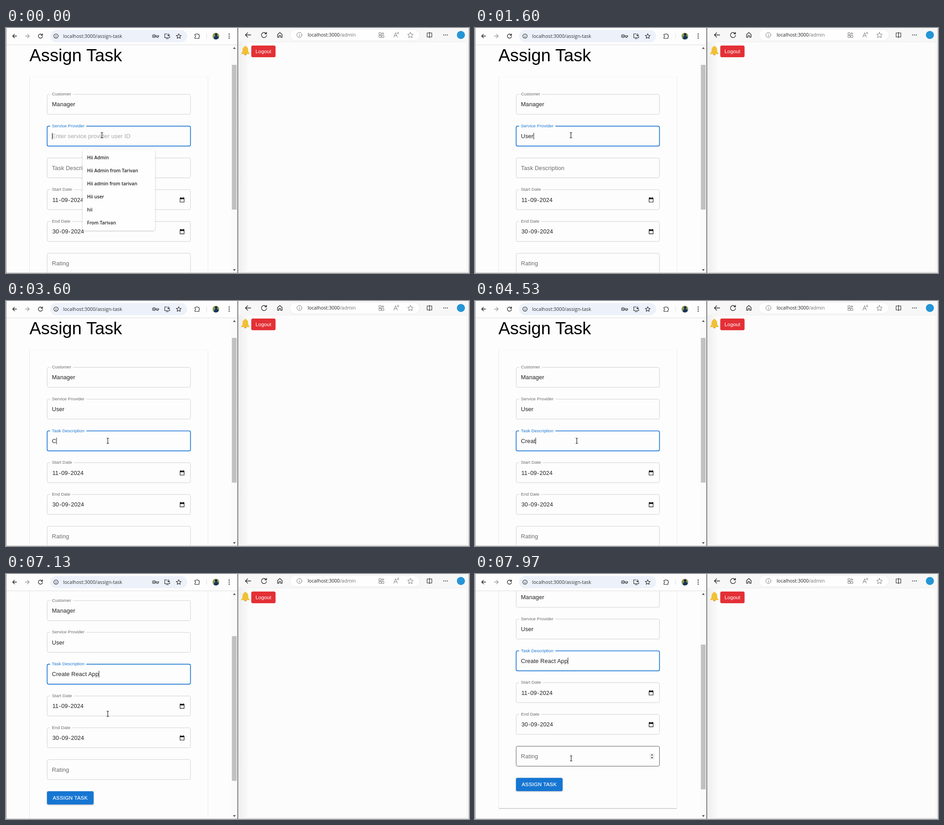
Animation, 1028 px wide and 545 px high, one loop 8000 ms. Source, as an HTML page:

```html
<!DOCTYPE html>
<html lang="en">
<head>
<meta charset="utf-8">
<title>Assign Task</title>
<style>
  html, body { margin: 0; width: 100%; height: 100%; overflow: hidden; background: #fdfdfd; }
  svg { display: block; width: 1028px; height: 545px; }
  text { white-space: pre; }
  .page text { font-family: "Liberation Sans", Arial, sans-serif; font-size: 12.9px; letter-spacing: .12px; }
  .ui { font-family: "Open Sans", "Noto Sans", sans-serif; }
  .line { fill: none; stroke: #222; stroke-width: 1.3; stroke-linecap: round; stroke-linejoin: round; }
  .thin { stroke-width: 1.1; }
  .soft { stroke: #777; stroke-width: 1; }
</style>
</head>
<body>
<svg viewBox="0 0 1028 545" xmlns="http://www.w3.org/2000/svg">
  <defs>
    <clipPath id="view"><rect x="1" y="37.5" width="499.5" height="508"/></clipPath>
    <linearGradient id="edge"><stop offset="0" stop-color="#eeeeee"/><stop offset="1" stop-color="#fcfcfc"/></linearGradient>
    <filter id="shade" x="-10%" y="-10%" width="120%" height="125%">
      <feDropShadow dx="0" dy="1" stdDeviation="1.4" flood-color="#000" flood-opacity=".28"/>
    </filter>
    <clipPath id="face"><circle cx="466" cy="18" r="7.5"/></clipPath>
  </defs>

  <rect width="1028" height="545" fill="#fdfdfd"/>

  <g class="page" clip-path="url(#view)">
    <g id="scroll">
      <path d="M52.5 108V639M448.5 108V639" stroke="#e9e9ec" fill="none"/>
      <path d="M53 108.500H448" stroke="#f7f7f7"/>
      <path d="M53 640.300H448" stroke="#e6e6e6"/>
      <path d="M53 639.300H448" stroke="#bdbdb8"/>
      <text x="52" y="74" style="font-size:38.7px;letter-spacing:0">Assign Task</text>
      <g id="fields"></g>
      <g filter="url(#shade)"><rect x="91" y="571.500" width="103.500" height="29.500" rx="3.200" fill="#1976d2"/></g>
      <text x="103.700" y="590" fill="#fff" style="font-size:11.3px;letter-spacing:.32px;stroke:#fff;stroke-width:.2px">ASSIGN TASK</text>
    </g>
  </g>

  <g id="popup" class="ui" font-size="10.200" font-weight="600" fill="#222"></g>

  <!-- scrollbar -->
  <rect x="500.500" y="37.500" width="13" height="508" fill="#fafafa"/>
  <rect id="thumb" x="501.500" y="82" width="10.500" height="322" fill="#c1c1c1"/>
  <path d="M504 46.500L507 42.500L510 46.500ZM504 536.500L507 540.500L510 536.500Z" fill="#505050"/>

  <!-- left toolbar -->
  <rect width="514" height="37" fill="#fdfdfd"/>
  <path d="M0 37.500H514" stroke="#dedede"/>
  <rect x="98" y="4.500" width="304" height="27" rx="13.500" fill="#ecf1fa"/>
  <path class="line" d="M23.500 18H14.800M18.800 14L14.800 18L18.800 22"/>
  <path class="line" stroke-opacity=".45" d="M43 18H51.700M47.700 14L51.700 18L47.700 22"/>
  <path class="line" d="M80.300 15.500A4.600 4.600 0 1 0 81 19M81 13V16.300H77.600"/>
  <circle class="line thin" cx="111" cy="18" r="4.800"/>
  <path class="line thin" d="M111 17.500V20.500M111 15.500V15.600"/>
  <text class="ui" x="126.700" y="21.800" font-size="10.700" fill="#333">localhost:3000/assign-task</text>
  <g class="line thin">
    <circle cx="328.500" cy="18" r="3.300"/><circle cx="328.500" cy="18" r=".7"/>
    <path d="M331.500 17H339V19.200H337.500V21H335V19.200H331.500"/>
    <path d="M358 13H352.500V21.500H363.500V18.500M355.500 23.800H360.500M361 12.500V17.500M358.700 15.500L361 17.800L363.300 15.500"/>
    <path d="M419.500 14H422.500A1.700 1.700 0 0 1 425.800 14H428.500V16.800A1.700 1.700 0 0 1 428.500 20V23.300H419.500V20.300A1.800 1.800 0 0 0 419.500 16.800Z"/>
    <path id="star" d="M383.500 12.600L385.100 16.200L389 16.600L386.100 19.200L386.900 23L383.500 21L380.100 23L380.900 19.200L378 16.600L381.900 16.200Z"/>
  </g>
  <path d="M445.500 12V24" stroke="#d5dff0"/>
  <g clip-path="url(#face)">
    <circle cx="466" cy="18" r="8" fill="#8d9b55"/>
    <circle cx="466.500" cy="14.500" r="2.800" fill="#1d2a3c"/>
    <ellipse cx="467" cy="23" rx="5.500" ry="6" fill="#17365b"/>
  </g>
  <g fill="#222"><circle cx="495.500" cy="13.500" r="1.200"/><circle cx="495.500" cy="18" r="1.200"/><circle cx="495.500" cy="22.500" r="1.200"/></g>
  <path d="M.5 0V545" stroke="#8a8a8a"/>
  <path d="M0 544.600H514" stroke="#a8a8a8" stroke-width=".8"/>

  <!-- right window -->
  <rect x="514" width="514" height="545" fill="#f7f7f7"/>
  <rect x="518" y="31" width="506" height="511" rx="5" fill="#fcfcfc" stroke="#ececec"/>
  <rect x="516" y="31" width="24" height="511" fill="url(#edge)"/>
  <path d="M514.600 0V545" stroke="#6b6b6b" stroke-width="1.800"/>
  <path d="M1027.500 0V545M516 544.500H1028" stroke="#b5b5b5" stroke-width=".8"/>
  <rect x="630.500" y="3.500" width="288" height="24.500" rx="12.200" fill="#fefefe" stroke="#ededed"/>
  <path class="line" d="M543.500 15.500H531.500M536.500 10.500L531.500 15.500L536.500 20.500"/>
  <path class="line" d="M577.700 12.500A5.700 5.700 0 1 0 578.600 16.500M578.500 9.500V13H574.800"/>
  <path class="line" d="M603 14.500L608 10L613 14.500V20.700H609.800V16.800H606.200V20.700H603Z"/>
  <circle class="line soft" cx="651.500" cy="15.500" r="5.600"/>
  <path class="line soft" d="M651.500 15.200V18.500M651.500 12.700V12.800"/>
  <text class="ui" x="669.700" y="19.300" font-size="10.600" fill="#222">localhost:3000<tspan fill="#707070">/admin</tspan></text>
  <path class="line soft" d="M828.500 10.500H833V15H828.500ZM828.500 16.500H833V21H828.500ZM834.500 16.500H839V21H834.500ZM836.800 9.800V14.800M834.300 12.300H839.300"/>
  <path class="line soft" d="M861 20.500L865 10.500L869 20.500M862.400 17H867.600M869 9.500Q870.500 11 869 12.800M871 8.800Q873 11 871 13.500"/>
  <path class="line soft" d="M898 9.800L899.900 13.700L904.200 14.200L901 17.200L901.900 21.400L898 19.300L894.100 21.400L895 17.200L891.800 14.200L896.100 13.700Z"/>
  <path class="line thin" d="M935 11H945.500V20H935ZM940.300 9.300V21.700"/>
  <g fill="#222"><circle cx="972" cy="15.500" r="1.100"/><circle cx="976" cy="15.500" r="1.100"/><circle cx="980" cy="15.500" r="1.100"/></g>
  <circle cx="1010" cy="15.500" r="9" fill="#2495d6"/>
  <path d="M531.500 39.500C529.800 39.500 529.700 41 529.700 41.600C525.500 42.800 525.200 47 525.200 50C525.200 53 523.500 55 522.300 56.800V58H540.700V56.800C539.500 55 537.800 53 537.800 50C537.800 47 537.500 42.800 533.300 41.600C533.300 41 533.200 39.500 531.500 39.500Z" fill="#f2c037"/>
  <path d="M528.800 58.200H534.200A2.700 2.500 0 0 1 528.800 58.200" fill="#d99a20"/>
  <rect x="544.500" y="39" width="54" height="26" rx="3.500" fill="#e33036"/>
  <text x="554" y="56" font-family="Liberation Sans, Arial, sans-serif" font-size="11.400" fill="#fff">Logout</text>

  <g id="pointer">
    <path id="beam" d="M-2.500 -6Q0 -6 0 -4.500Q0 -6 2.500 -6M0 -5V5M-2.500 6Q0 6 0 4.500Q0 6 2.500 6" fill="none" stroke="#222" stroke-width="1.200"/>
    <path id="arrow" d="M0 0V12L2.800 9.400L4.600 13.500L6.500 12.700L4.700 8.700H8.500Z" fill="#fff" stroke="#111" stroke-width=".8"/>
  </g>
</svg>
<script>
const LOOP = 8000, BLUE = "#1976d2", FIELD_TOP = 147.6, PITCH = 70.7, FIELD_H = 44.4;
const $ = id => document.getElementById(id);
const clamp = v => Math.max(0, Math.min(1, v));
const ease = v => { v = clamp(v); return v * v * (3 - 2 * v); };
const mix = (a, b, p) => a + (b - a) * p;
const show = (node, on) => node.setAttribute("visibility", on ? "visible" : "hidden");

function add(parent, tag, attrs, text) {
  const node = document.createElementNS("http://www.w3.org/2000/svg", tag);
  for (const key in attrs) node.setAttribute(key, attrs[key]);
  if (text) node.textContent = text;
  return parent.appendChild(node);
}

// Form fields
const CUSTOMER = 0, PROVIDER = 1, TASK = 2, RATING = 5;
const labels = ["Customer", "Service Provider", "Task Description", "Start Date", "End Date", "Rating"];
const values = ["Manager", "", "", "11-09-2024", "30-09-2024", ""];

const fields = labels.map((name, i) => {
  const y = FIELD_TOP + PITCH * i, root = $("fields");
  const box = add(root, "rect", { x: 91.4, y, width: 318.2, height: FIELD_H, rx: 3.2, fill: "none" });
  const notch = add(root, "rect", { x: 98, y: y - 2, height: 4, fill: "#fdfdfd" });
  const label = add(root, "text", {}, name);
  const value = add(root, "text", { x: 102, y: y + 26.8, fill: "#212121" });
  if (values[i].includes("-")) {
    values[i].split("-").forEach((part, n) => {
      if (n) add(value, "tspan", { dx: .8 }, "-");
      add(value, "tspan", { dx: n ? .8 : 1 }, part);
    });
    add(root, "path", {
      d: `M386.500 ${y + 18.5}H395.500V${y + 27.5}H386.500Z`, fill: "none", stroke: "#111", "stroke-width": 1.1
    });
    add(root, "path", { d: `M386 ${y + 18}H396V${y + 21}H386ZM387.500 ${y + 16.7}H389V${y + 18}H387.500ZM393 ${y + 16.7}H394.500V${y + 18}H393Z`, fill: "#111" });
  } else value.textContent = values[i];
  return { y, box, notch, label, value, length: label.getComputedTextLength() };
});

const hint = add($("fields"), "text", { x: 102, y: fields[PROVIDER].y + 26.8, fill: "#a6a6a6" }, "Enter service provider user ID");
const caret = add($("fields"), "rect", { width: 1, height: 14.5, fill: "#111" });
const ry = fields[RATING].y;
const spinner = add($("fields"), "g", {});
add(spinner, "rect", { x: 387, y: ry + 15.5, width: 12, height: 14, fill: "#f0f0f0" });
add(spinner, "path", { d: `M390.300 ${ry + 20.5}L393 ${ry + 17.5}L395.700 ${ry + 20.5}ZM390.300 ${ry + 24.5}L393 ${ry + 27.5}L395.700 ${ry + 24.5}Z`, fill: "#444" });

// Autofill suggestions
const popup = $("popup");
const bubble = add(popup, "g", { filter: "url(#shade)" });
add(bubble, "rect", { x: 170, y: 270, width: 161, height: 180.5, rx: 5, fill: "#fefefe" });
add(bubble, "path", { d: "M181 270.500L187.500 265.500L194 270.500Z", fill: "#fefefe" });
["Hii Admin", "Hii Admin from Tarivan", "Hii admin from tarivan", "Hii user", "hii", "From Tarivan"]
  .forEach((line, i) => add(popup, "text", { x: 180, y: 291.7 + 29 * i }, line));

// Typing: the time of each key press
const userKeys = [780, 1000, 1190, 1400];
const taskKeys = [3600, 3800, 4000, 4200, 4430, 4600, 4800, 5050, 5200, 5400, 5600, 5800, 5980, 6200, 6400, 6640];
const FOCUS_TASK = 3000;
const typed = (text, keys, t) => text.slice(0, keys.filter(k => k <= t).length);

// Pointer stops: time, x, y
const stops = [[0, 213, 238.5], [1750, 213, 238.5], [2430, 226, 311], [7500, 226, 311], [7900, 213.5, 410], [LOOP, 213.5, 410]];
function pointerAt(t) {
  const i = stops.findIndex(s => s[0] > t), a = stops[i - 1], b = stops[i];
  const p = ease((t - a[0]) / (b[0] - a[0]));
  return [mix(a[1], b[1], p), mix(a[2], b[2], p)];
}

const scrollAt = t => 80.7 * ease((t - 6800) / 170) + 37.3 * ease((t - 7096) / 120);

function render(t) {
  const scroll = scrollAt(t), [px, py] = pointerAt(t);
  const focus = t < FOCUS_TASK ? PROVIDER : TASK;
  const stale = t > 6800 && t < 7500;
  const over = fields.findIndex(f => py + scroll >= f.y && py + scroll <= f.y + FIELD_H);

  $("scroll").setAttribute("transform", `translate(0 ${-scroll})`);
  $("thumb").setAttribute("y", 82 + scroll * .636);

  fields[PROVIDER].value.textContent = typed("User", userKeys, t);
  fields[TASK].value.textContent = typed("Create React App", taskKeys, t);
  show(hint, t < userKeys[0]);

  fields.forEach((f, i) => {
    const active = i === focus, hover = !stale && i === over;
    const up = i === RATING ? 0 : i === TASK ? ease((t - FOCUS_TASK) / 200) : 1;
    const size = mix(1, .75, up);
    f.box.setAttribute("stroke", active ? BLUE : hover ? "#4a4a4a" : "#cbcbcb");
    f.box.setAttribute("stroke-width", active ? 1.7 : .9);
    f.notch.setAttribute("width", up * (f.length * .75 + 8));
    f.label.setAttribute("fill", active ? BLUE : "#6a6a6a");
    f.label.setAttribute("transform", `translate(102 ${f.y + mix(27, 2.5, up)}) scale(${size})`);
  });
  show(spinner, !stale && over === RATING);

  const lastKey = [0, ...userKeys, FOCUS_TASK, ...taskKeys].filter(k => k <= t).pop();
  const text = fields[focus].value;
  caret.setAttribute("x", 102.2 + (text.textContent ? text.getComputedTextLength() : 0));
  caret.setAttribute("y", fields[focus].y + 15);
  show(caret, (t - lastKey) % 1060 < 530);

  const fade = clamp((t - 800) / 150), s = 1 - .07 * fade;
  popup.setAttribute("opacity", 1 - fade);
  popup.setAttribute("transform", `translate(250.500 360.300) scale(${s}) translate(-250.500 -360.300)`);
  show(popup, fade < 1);

  $("pointer").setAttribute("transform", `translate(${px} ${py})`);
  show($("beam"), stale || over >= 0);
  show($("arrow"), !stale && over < 0);
}

function tick() {
  render(performance.now() % LOOP);
  requestAnimationFrame(tick);
}
tick();
</script>
</body>
</html>
```
